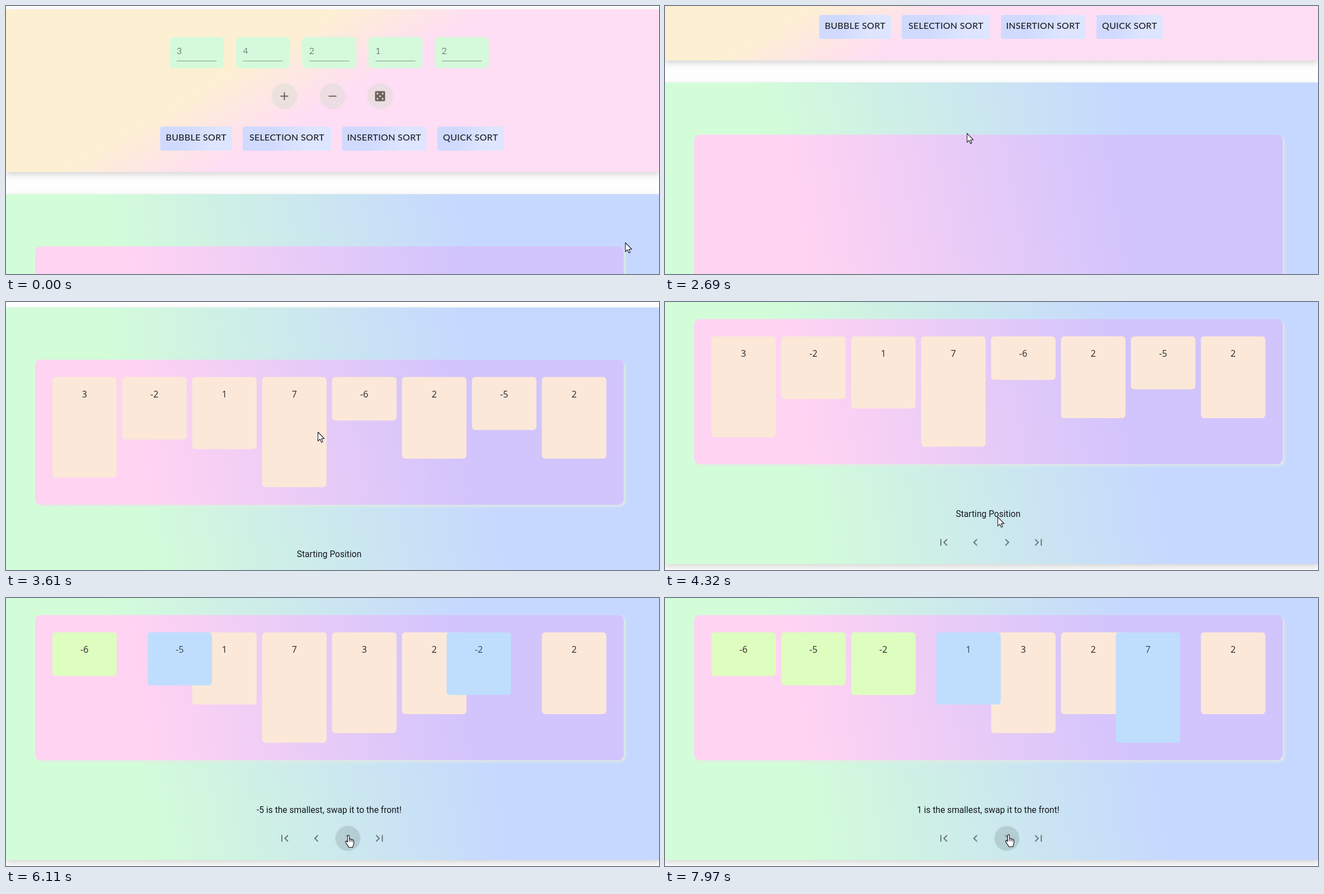
An HTML page with a canvas for the animation above (8 s loop, 1167 by 480 pixels).

```html
<!DOCTYPE html>
<html lang="en">
<head>
<meta charset="utf-8">
<title>Sorting visualiser</title>
<style>
html, body { margin: 0; width: 100%; height: 100%; overflow: hidden; background: #fefefe; }
canvas { display: block; }
</style>
</head>
<body>
<canvas id="stage" width="1167" height="480"></canvas>
<script>
const ctx = document.getElementById('stage').getContext('2d');
const W = 1167, H = 480, LOOP = 8000;

const CREAM = '#fbe8d9', BLUE = '#bfdefe', GREEN = '#defec0';
const FIRST = [3, 4, 2, 1, 2];
const VALUES = [3, -2, 1, 7, -6, 2, -5, 2];
const ADDS = [600, 740, 960];          // clicks on the plus button
const ROLL = 1370;                     // click on the dice
const SCROLLS = [2050, 2440, 2898, 3556];
const CARDS_IN = 2892;
// Each step swaps two slots; press starts the ripple, start the movement.
const STEPS = [
  { press: 4795, start: 4963, a: 0, b: 4 },
  { press: 5715, start: 5775, a: 1, b: 6 },
  { press: 6715, start: 6775, a: 2, b: 6 },
  { press: 7585, start: 7635, a: 3, b: 6 }
];
const POINTER = [
  [60, 1107, 424], [520, 499, 163], [980, 499, 163], [1280, 669, 163],
  [1420, 669, 163], [1700, 541, 223.5], [1800, 541, 223.5], [1920, 539, 226],
  [2070, 539, 226], [2900, 540, 228.5], [3100, 540, 228.5], [3560, 557.5, 233],
  [3800, 557.5, 233], [4530, 604, 423], [4560, 604, 423], [4640, 605, 426],
  [5200, 605, 426], [5450, 612, 424.5], [6800, 612, 424.5], [7300, 614, 423.5]
];
const ROUND = [497.5, 583.5, 668.5];
const NAV = [498, 554.5, 611, 667.5];
const SORTS = [
  ['BUBBLE SORT', 275.5, 128.5], ['SELECTION SORT', 423, 158],
  ['INSERTION SORT', 600.5, 150.5], ['QUICK SORT', 771, 118.5]
];

const ARROW = new Path2D('M0 0V16L3.7 12.6L6.2 18.2L8.6 17.1L6.2 11.7H11.3Z');
const HAND = new Path2D('M4.5 12.5V2a1.6 1.6 0 0 1 3.2 0V8c0-1 2.9-1 2.9.6c0-1.2 2.7-.9 2.7.7' +
  'c0-1 2.3-.7 2.3 1V15c0 3-1.8 4-1.8 7H6.3c0-2.5-3.6-5-5.6-9.2c-.6-1.6 1.3-2.2 2.3-1z');
const KNUCKLES = new Path2D('M7.7 8V12M10.6 9V12M13.3 10V12.5');

const clamp = v => Math.max(0, Math.min(1, v));
const lerp = (a, b, k) => a + (b - a) * k;
const smooth = v => { v = clamp(v); return v * v * (3 - 2 * v); };

// CSS "ease": cubic-bezier(.25, .1, .25, 1)
function ease(x) {
  x = clamp(x);
  const curve = (u, p, q) => 3 * u * (1 - u) ** 2 * p + 3 * u * u * (1 - u) * q + u ** 3;
  let lo = 0, hi = 1;
  for (let i = 0; i < 24; i++) {
    const mid = (lo + hi) / 2;
    if (curve(mid, .25, .25) < x) lo = mid; else hi = mid;
  }
  return curve(lo, .1, 1);
}

function box(x, y, w, h, r, fill) {
  ctx.beginPath();
  ctx.roundRect(x, y, w, h, r);
  ctx.fillStyle = fill;
  ctx.fill();
}

function disc(x, y, r, fill) {
  ctx.beginPath();
  ctx.arc(x, y, r, 0, 7);
  ctx.fillStyle = fill;
  ctx.fill();
}

function label(text, x, y, font, fill, align = 'center') {
  ctx.font = font;
  ctx.textAlign = align;
  ctx.fillStyle = fill;
  ctx.fillText(text, x, y);
}

function lines(path, color, width = 2) {
  ctx.strokeStyle = color;
  ctx.lineWidth = width;
  ctx.stroke(new Path2D(path));
}

// Gradient at a CSS angle between two distances from an origin.
function slope(x, y, deg, from, to, c0, c1) {
  const a = deg * Math.PI / 180, dx = Math.sin(a), dy = -Math.cos(a);
  const g = ctx.createLinearGradient(x + dx * from, y + dy * from, x + dx * to, y + dy * to);
  g.addColorStop(0, c0);
  g.addColorStop(1, c1);
  return g;
}

function shadowed(color, dx, dy, blur, draw) {
  ctx.save();
  ctx.shadowColor = color;
  ctx.shadowOffsetX = dx;
  ctx.shadowOffsetY = dy;
  ctx.shadowBlur = blur;
  draw();
  ctx.restore();
}

function ripple(x, y, age) {
  if (age < 0 || age > 640) return;
  const grow = 1 - (1 - clamp(age / 500)) ** 2;
  const alpha = .11 * (1 - clamp((age - 300) / 340));
  disc(x, y, 23 * grow, `rgba(0,0,0,${alpha})`);
}

function pointerAt(t) {
  let i = POINTER.findIndex(p => p[0] > t);
  if (i === 0) return POINTER[0].slice(1);
  if (i < 0) return POINTER[POINTER.length - 1].slice(1);
  const [t0, x0, y0] = POINTER[i - 1], [t1, x1, y1] = POINTER[i];
  const k = smooth((t - t0) / (t1 - t0));
  return [lerp(x0, x1, k), lerp(y0, y1, k)];
}

function drawField(value, x) {
  box(x, 55.5, 96.6, 56, 8, '#d4fadb');
  label(value, x + 12.5, 86, '300 16px Lato, sans-serif', '#2c3038', 'left');
  lines(`M${x + 12.5} 98.5h71.5`, '#85958a', 1);
}

function drawControls(t) {
  shadowed('rgba(0,0,0,.16)', 0, 4, 10, () =>
    box(0, 6, W, 291.5, 0, slope(0, 0, 150, 300, 440, '#fdf0d2', '#fedef4')));

  const added = ADDS.filter(a => t >= a).length;
  const fields = t >= ROLL ? VALUES : FIRST.concat(Array(added).fill(0));
  const left = 577.6 - (fields.length * 118.4 - 21.8) / 2;
  fields.forEach((v, i) => drawField(v, left + i * 118.4));

  const y = 161.5, ink = '#6b6259';
  ROUND.forEach(x => disc(x, y, 23.2, 'rgba(214,220,208,.45)'));
  ADDS.forEach(a => ripple(ROUND[0], y, t - a + 60));
  ripple(ROUND[2], y, t - ROLL + 60);
  lines(`M${ROUND[0] - 7} ${y}h14m-7 -7v14`, ink);
  lines(`M${ROUND[1] - 7} ${y}h14`, ink);
  box(ROUND[2] - 9, y - 9, 18, 18, 2, ink);
  [[0, 0], [-4.6, -4.6], [4.6, -4.6], [-4.6, 4.6], [4.6, 4.6]].forEach(([dx, dy]) =>
    disc(ROUND[2] + dx, y + dy, 1.6, '#eddde3'));

  ctx.letterSpacing = '0.3px';
  for (const [name, x, w] of SORTS) {
    box(x, 216, w, 43, 4, slope(x, 216, 110, w * .35, w * .75, '#d0dafe', '#dde5ff'));
    label(name, x + w / 2, 241, '500 16px Lato, sans-serif', '#1c1e28');
  }
  ctx.letterSpacing = '0px';
}

function drawCard(value, x, color, scale) {
  const rank = VALUES.filter(v => v < value).length;
  const h = 78 + 17.1 * rank, top = 461.5;
  ctx.save();
  ctx.globalAlpha = scale;
  ctx.translate(x + 57.5, top + h / 2);
  ctx.scale(scale, scale);
  box(-57.5, -h / 2, 115.2, h, 6, color);
  label(value, 0, 36.5 - h / 2, '16px "Open Sans", sans-serif', color === BLUE ? '#36434f' : '#26262a');
  ctx.restore();
}

function drawCards(t) {
  const scale = ease((t - CARDS_IN) / 450);
  if (scale <= 0) return;
  const order = VALUES.slice();
  const done = STEPS.filter(s => t >= s.start);
  const step = done[done.length - 1];
  for (const s of done) [order[s.a], order[s.b]] = [order[s.b], order[s.a]];

  const slot = i => 82.7 + 125 * i;
  order.forEach((v, i) => {
    if (step && (i === step.a || i === step.b)) return;
    drawCard(v, slot(i), i < done.length - 1 ? GREEN : CREAM, scale);
  });
  if (step) {
    const k = ease((t - step.start) / 500);
    drawCard(order[step.a], lerp(slot(step.b), slot(step.a), k), BLUE, 1);
    drawCard(order[step.b], lerp(slot(step.a), slot(step.b), k), BLUE, 1);
  }

  const text = step ? `${order[step.a]} is the smallest, swap it to the front!` : 'Starting Position';
  label(text, 577.5, 784.5, '15.6px Roboto, sans-serif', '#17171c');
}

function drawNav(t, hovered) {
  const y = 830.5, ink = '#6a7679';
  if (hovered >= 0) disc(NAV[hovered], y, 23.2, 'rgba(0,0,0,.04)');
  STEPS.forEach(s => ripple(NAV[2], y, t - s.press));
  const [first, prev, next, last] = NAV;
  lines(`M${first - 5} ${y - 6}v12M${first + 6} ${y - 5.5}l-5.5 5.5l5.5 5.5`, ink);
  lines(`M${prev + 3} ${y - 5.5}l-5.5 5.5l5.5 5.5`, ink);
  lines(`M${next - 2.5} ${y - 5.5}l5.5 5.5l-5.5 5.5`, ink);
  lines(`M${last + 5} ${y - 6}v12M${last - 6} ${y - 5.5}l5.5 5.5l-5.5 5.5`, ink);
}

function drawBoard(t, hovered) {
  shadowed('rgba(0,0,0,.16)', 0, 4, 10, () =>
    box(0, 337, W, 532.5, 0, slope(0, 337, 80, 150, 800, '#d3fdd8', '#c6d8ff')));
  shadowed('rgba(226,236,226,.9)', 3, 3, 4, () =>
    box(52, 430.5, 1052, 260, 10, slope(52, 430.5, 80, 165, 735, '#ffd3f2', '#d2c4fc')));
  drawCards(t);
  if (t >= CARDS_IN) drawNav(t, hovered);
}

function drawPointer(x, y, hand) {
  ctx.save();
  ctx.translate(hand ? x - 6 : x, y);
  const shape = hand ? HAND : ARROW;
  ctx.fillStyle = '#fff';
  ctx.fill(shape);
  ctx.strokeStyle = '#15151c';
  ctx.lineWidth = 1.1;
  ctx.lineJoin = 'round';
  ctx.stroke(shape);
  if (hand) ctx.stroke(KNUCKLES);
  ctx.restore();
}

function render(t) {
  const scroll = SCROLLS.reduce((sum, s) => sum + 100 * smooth((t - s) / 160), 0);
  const [x, y] = pointerAt(t), pageY = y + scroll;
  const near = (cx, cy) => Math.hypot(x - cx, pageY - cy) < 23;
  const hovered = NAV.findIndex(cx => near(cx, 830.5));
  const hand = hovered >= 0 || ROUND.some(cx => near(cx, 161.5)) ||
    SORTS.some(([, bx, w]) => x > bx && x < bx + w && pageY > 216 && pageY < 259);

  ctx.fillStyle = '#fefefe';
  ctx.fillRect(0, 0, W, H);
  ctx.save();
  ctx.translate(0, -scroll);
  drawControls(t);
  drawBoard(t, hovered);
  ctx.restore();
  drawPointer(x, y, hand);
}

const begin = performance.now();
function frame() {
  render((performance.now() - begin) % LOOP);
  requestAnimationFrame(frame);
}
frame();
</script>
</body>
</html>
```
